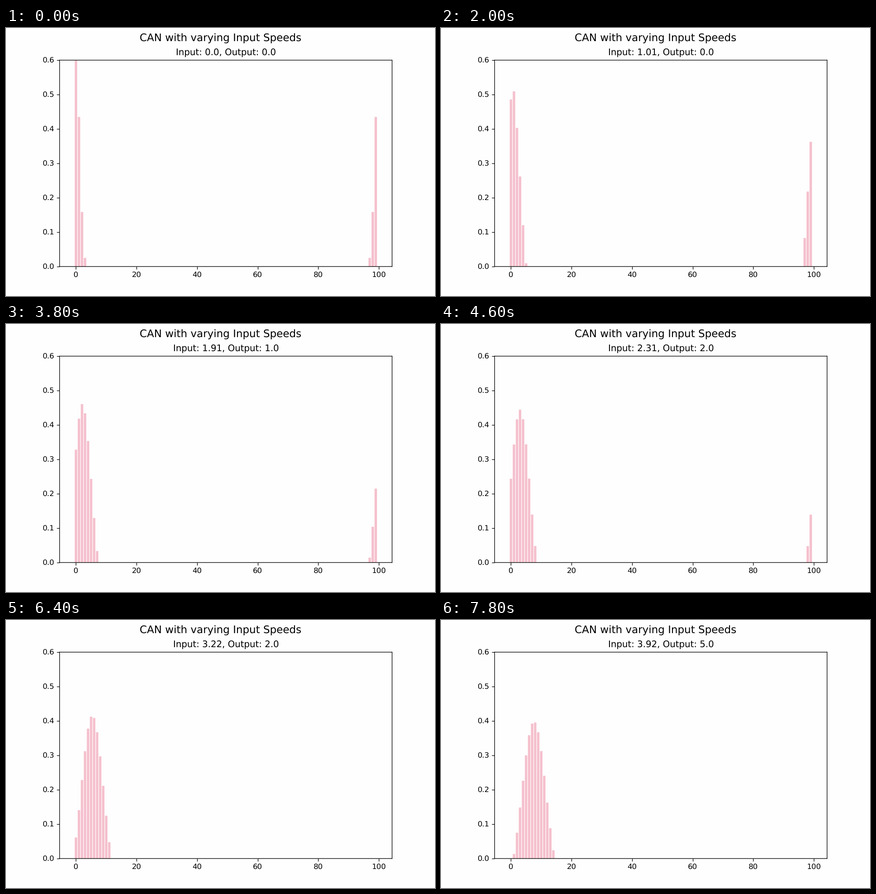
A matplotlib script for the animation above (8 s loop, 947 px wide and 592 px high).

```python
import numpy as np
import matplotlib.pyplot as plt
from matplotlib.animation import FuncAnimation

W, H, DPI = 947, 592, 118.375
CELLS, FRAMES, STEP_MS = 100, 40, 200
PINK, PAPER = "#f5c0cd", "#fefefe"
OUTPUT_RISES = [13, 20, 33, 36, 39]
SPEEDS = np.linspace(0, 20, 200)


def activity(n):
    """A widening Gaussian bump on a ring, cut off below by inhibition."""
    # Steadily rising speed moves the bump almost quadratically
    centre = n * (n + 1) * (.00626 - .0000357 * n)
    half = CELLS / 2
    d2 = ((np.arange(CELLS) - centre + half) % CELLS - half) ** 2

    spread = 5.9 + .6 * n + .0018 * n * n
    settle = np.exp(-n / 4.5)  # the sharp starting spike dies away
    height = 1.008 * spread ** -.192 - .28 * settle
    inhibition = .12 - .05 * settle
    bump = height * np.exp(-d2 / spread) - inhibition
    return np.maximum(bump + .37 * settle * np.exp(-d2), 0) * (bump > 0)


plt.rcParams.update({
    "font.family": "DejaVu Sans",
    "path.snap": False,
    "text.hinting": "no_hinting",
})
fig, ax = plt.subplots(figsize=((W + 1e-4) / DPI, (H + 1e-4) / DPI),
                       dpi=DPI, facecolor=PAPER)
fig.subplots_adjust(left=.125, right=.9, bottom=.11, top=.88)
fig.suptitle("CAN with varying Input Speeds", fontsize=14)
ax.set_facecolor(PAPER)
bars = ax.bar(np.arange(CELLS), activity(0), width=.8, color=PINK)
ax.set_xlim(-5.39, 104.39)
ax.set_ylim(0, .6)
title = ax.set_title("", fontsize=12)


def draw(n):
    for bar, height in zip(bars, activity(n)):
        bar.set_height(height)
    output = float(np.searchsorted(OUTPUT_RISES, n, side="right"))
    title.set_text(f"Input: {round(float(SPEEDS[n]), 2)}, Output: {output}")
    return [*bars, title]


anim = FuncAnimation(fig, draw, frames=FRAMES, interval=STEP_MS,
                     repeat=True, repeat_delay=0)
plt.show()
```
